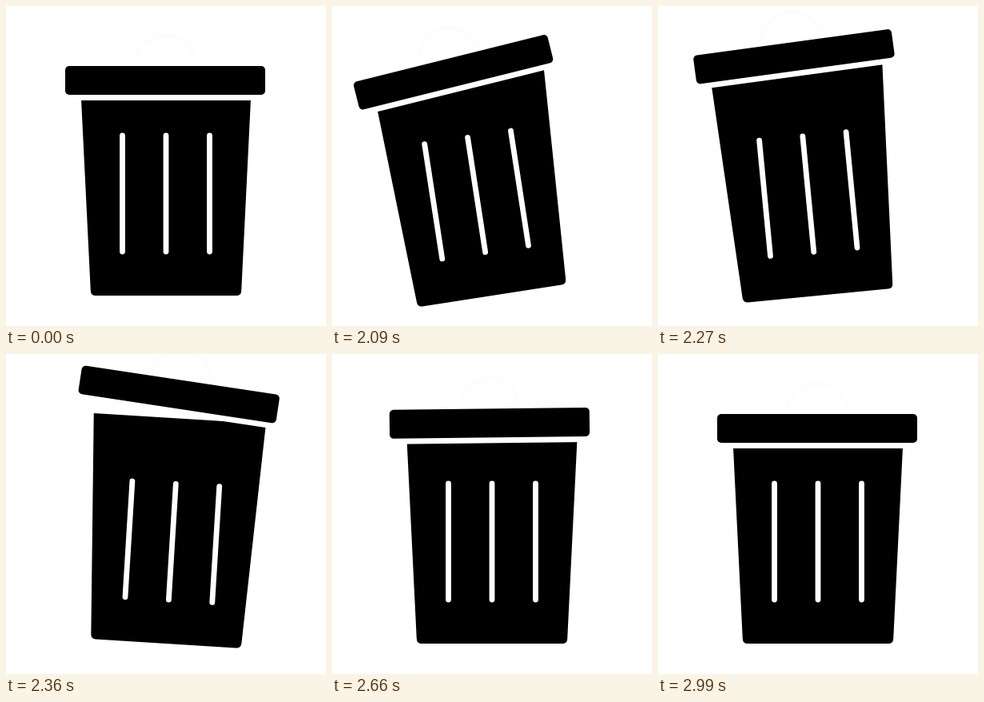
An HTML page for the animation above (3.08 s loop, 400x400 px).

```html
<!DOCTYPE html>
<html lang="en">
<head>
<meta charset="utf-8">
<title>Trash can</title>
<style>
html, body { margin: 0; height: 100%; overflow: hidden; background: #fff; }
svg { display: block; width: 100%; height: 100%; }
</style>
</head>
<body>
<svg viewBox="0 0 400 400">
  <g id="can">
    <path d="M92.2 80H307.8L294.2 356Q293.9 362 288 362H112Q106.1 362 105.8 356Z"/>
    <path d="M145.5 162V307M200 162V307M254.5 162V307" stroke="#fff" stroke-width="6.8" stroke-linecap="round"/>
  </g>
  <g id="lid">
    <circle cy="-18" r="38" fill="none" stroke="#fdfdfd" stroke-width="6"/>
    <!-- the white outline keeps a gap between lid and can -->
    <rect x="-125" y="-18" width="250" height="36" rx="5" stroke="#fff" stroke-width="14" stroke-linejoin="round" paint-order="stroke"/>
  </g>
</svg>
<script>
const LOOP = 3080, START = 2000, STEP = 30, END = 990;
const can = document.getElementById('can'), lid = document.getElementById('lid');

// Sine ease from one [time, value] turning point to the next
function swing(t, ...points) {
  const i = points.findIndex(p => p[0] > t);
  if (i < 0) return points.at(-1)[1];
  const [t0, a] = points[i - 1], [t1, b] = points[i];
  return a + (b - a) * (1 - Math.cos(Math.PI * (t - t0) / (t1 - t0))) / 2;
}

// The can tips left, swings past upright and settles; its lid hops and lags behind.
function draw(now) {
  const steps = Math.floor((now % LOOP - START) / STEP);
  const t = steps < 1 ? END : steps * STEP;
  const lean = swing(t, [-34, 0], [127, -10], [195, -10], [395, 4.6], [525, 0]);
  const lift = swing(t, [0, 0], [125, 17.5], [175, 17.5], [355, 43], [585, 7.2], [END, 0]);
  const tilt = swing(t, [0, 0], [110, -5.7], [180, -5.7], [470, 10], [600, -0.75], [END, 0]);
  const slide = swing(t, [0, 0], [110, -4.6], [175, -4.6], [290, 0], [470, -6], [600, -2.2], [END, 0]);
  const pose = `rotate(${lean} 200 362)`;
  can.setAttribute('transform', pose);
  lid.setAttribute('transform', `${pose} translate(${199 + slide} ${93 - lift}) rotate(${tilt})`);
}

const begin = performance.now();
function tick() {
  draw(performance.now() - begin);
  requestAnimationFrame(tick);
}
tick();
</script>
</body>
</html>
```
